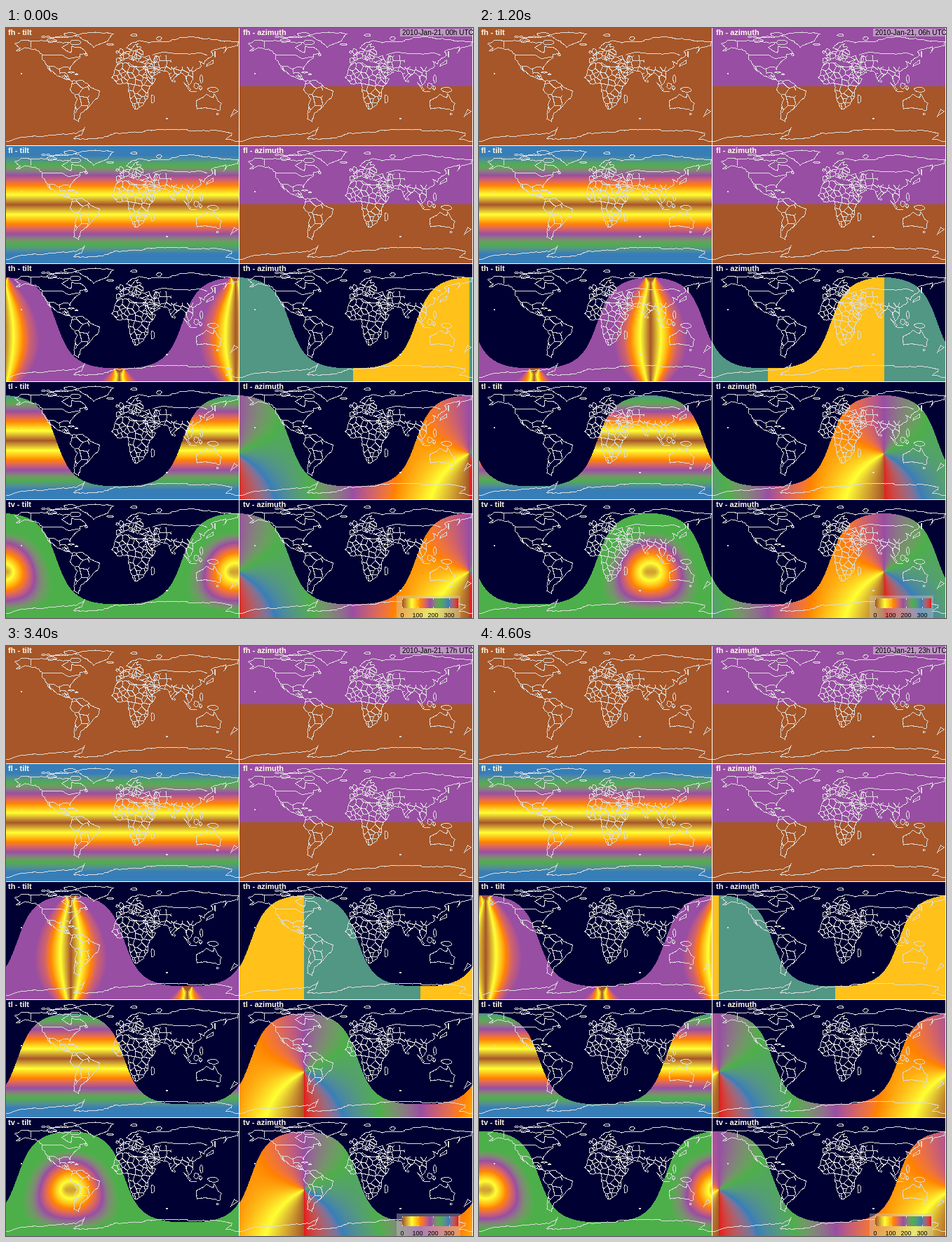
Write an HTML page with a canvas that moves like this. It is 666 by 840 pixels and loops after 4.8 s.

```html
<!DOCTYPE html>
<html lang="en">
<head>
<meta charset="utf-8">
<title>Tilt and azimuth through one day</title>
<style>
html, body { margin: 0; width: 666px; height: 840px; overflow: hidden; background: #fff; }
canvas { display: block; }
</style>
</head>
<body>
<canvas id="stage" width="666" height="840"></canvas>
<script>
const W = 332, H = 168, MAP_H = 167, COL = 333, ROW = 168;
const HOUR_MS = 200;
const RAD = Math.PI / 180;
const NIGHT = -1;

const ctx = document.getElementById('stage').getContext('2d');

function makeLayer() {
  const c = document.createElement('canvas');
  c.width = W;
  c.height = H;
  return c.getContext('2d', { willReadFrequently: true });
}

let seed = 7;
function random() {
  seed = (seed * 16807) % 2147483647;
  return seed / 2147483647;
}

// ---- palette: seven stops, 60 degrees apart, blended in Lab ----
const stops = [[166, 86, 40], [255, 255, 51], [255, 127, 0], [152, 78, 163],
               [77, 175, 74], [55, 126, 184], [228, 26, 28]];

function toLab(rgb) {
  const [r, g, b] = rgb.map(v => v / 255).map(v => v > .04045 ? ((v + .055) / 1.055) ** 2.4 : v / 12.92);
  const f = t => t > .008856 ? Math.cbrt(t) : 7.787 * t + 16 / 116;
  const x = f((.4124 * r + .3576 * g + .1805 * b) / .9505);
  const y = f(.2126 * r + .7152 * g + .0722 * b);
  const z = f((.0193 * r + .1192 * g + .9505 * b) / 1.089);
  return [116 * y - 16, 500 * (x - y), 200 * (y - z)];
}

function toRgb([l, a, b]) {
  const f = t => t > .2069 ? t ** 3 : (t - 16 / 116) / 7.787;
  const fy = (l + 16) / 116;
  const x = .9505 * f(fy + a / 500), y = f(fy), z = 1.089 * f(fy - b / 200);
  return [3.2406 * x - 1.5372 * y - .4986 * z,
          -.9689 * x + 1.8758 * y + .0415 * z,
          .0557 * x - .204 * y + 1.057 * z]
    .map(v => v > .0031308 ? 1.055 * v ** (1 / 2.4) - .055 : 12.92 * v)
    .map(v => Math.round(255 * Math.min(1, Math.max(0, v))));
}

const labStops = stops.map(toLab);
function colorAt(angle) {
  const k = Math.min(5, Math.floor(angle / 60)), f = angle / 60 - k;
  return toRgb(labStops[k].map((v, i) => v + (labStops[k + 1][i] - v) * f));
}
const pack = ([r, g, b]) => (255 << 24 | b << 16 | g << 8 | r) >>> 0;
const palette = Uint32Array.from({ length: 721 }, (_, i) => pack(colorAt(i / 2)));
const nightColor = pack([0, 0, 51]);

// ---- world map: key points in lon/lat, roughened coasts, cell borders ----
const world = makeLayer(), land = makeLayer();
world.fillStyle = '#dcdcdc';
const toX = lon => (lon + 180) * W / 360;
const toY = lat => (90 - lat) * MAP_H / 180;

function plot(points) {
  for (let i = 1; i < points.length; i++) {
    const [x0, y0] = points[i - 1], [x1, y1] = points[i];
    const x = toX(x0), y = toY(y0), dx = toX(x1) - x, dy = toY(y1) - y;
    const n = Math.ceil(Math.max(Math.abs(dx), Math.abs(dy), 1));
    for (let k = 0; k <= n; k++)
      world.fillRect(Math.floor(x + dx * k / n), Math.floor(y + dy * k / n), 1, 1);
  }
}

const pairs = flat => flat.filter((_, i) => i % 2 === 0).map((x, i) => [x, flat[2 * i + 1]]);
const line = (...flat) => plot(pairs(flat));

// Midpoint displacement between two key points; leaves out the first one.
function rough(a, b) {
  const dx = b[0] - a[0], dy = b[1] - a[1], len = Math.hypot(dx, dy);
  if (len < 3) return [b];
  const push = (random() - .5) * Math.min(.25, 2.5 / len);
  const mid = [(a[0] + b[0]) / 2 - dy * push, (a[1] + b[1]) / 2 + dx * push];
  return [...rough(a, mid), ...rough(mid, b)];
}

function coast(...flat) {
  const keys = pairs(flat);
  const points = [keys[0], ...keys.slice(1).flatMap((p, i) => rough(keys[i], p))];
  plot(points);
  return points;
}

function continent(...flat) {
  const points = coast(...flat, flat[0], flat[1]);
  land.beginPath();
  points.forEach(([lon, lat]) => land.lineTo(toX(lon), toY(lat)));
  land.fill();
}

function isle(lon, lat, rx, ry) {
  const points = Array.from({ length: 9 }, (_, i) => {
    const a = i * Math.PI / 4.5, r = .8 + random() * .4;
    return [lon + rx * r * Math.cos(a), lat + ry * r * Math.sin(a)];
  });
  plot([...points, points[0]]);
}

// Country-like cells around jittered seeds, kept to the land inside a box.
function borders(west, south, east, north, step) {
  const seeds = [];
  for (let lat = south; lat < north + step; lat += step)
    for (let lon = west; lon < east + step; lon += step)
      seeds.push([toX(lon + random() * step), toY(lat + random() * step)]);
  const cell = (x, y) => {
    let best = 0, least = Infinity;
    seeds.forEach(([sx, sy], i) => {
      const d = (x - sx) ** 2 + (y - sy) ** 2;
      if (d < least) { least = d; best = i; }
    });
    return best;
  };
  const mask = land.getImageData(0, 0, W, H).data;
  for (let y = Math.floor(toY(north)); y < toY(south); y++)
    for (let x = Math.floor(toX(west)); x < toX(east); x++) {
      if (mask[(y * W + x) * 4 + 3] < 128) continue;
      const c = cell(x, y);
      if (c !== cell(x + 1, y) || c !== cell(x, y + 1)) world.fillRect(x, y, 1, 1);
    }
}

function drawWorld() {
  // the Americas and Greenland
  continent(-166,66, -157,71, -128,70, -95,68, -82,68, -94,60, -80,52, -78,62, -65,60, -56,52, -66,49, -66,44,
    -76,36, -81,26, -84,30, -97,28, -97,20, -88,21, -83,14, -78,8, -86,11, -105,20, -113,30, -110,23, -118,34,
    -124,42, -124,49, -135,58, -150,60, -164,55, -158,59);
  continent(-78,8, -62,10, -50,0, -35,-7, -39,-18, -48,-27, -58,-36, -65,-42, -68,-54, -75,-50, -70,-18, -81,-5);
  continent(-73,78, -54,70, -44,60, -22,70, -14,81, -35,83, -60,82);
  // Africa and Eurasia
  continent(-6,36, 10,37, 20,31, 33,31, 43,12, 51,12, 40,-5, 40,-15, 33,-27, 20,-35, 12,-18, 9,4, -8,4, -17,14, -10,30);
  continent(-9,37, -9,43, -1,44, -4,48, 8,54, 21,56, 29,60, 22,61, 24,66, 17,61, 13,56, 6,59, 14,67, 27,71, 41,67,
    68,69, 104,77, 140,72, 180,69, 178,63, 162,59, 157,52, 160,61, 137,54, 140,48, 127,39, 126,35, 119,39, 122,31,
    108,21, 109,12, 103,2, 98,15, 91,22, 80,13, 77,8, 72,21, 57,26, 48,30, 58,22, 45,13, 34,30, 36,36, 27,38,
    41,42, 31,46, 23,38, 13,45, 18,40, 9,44, 0,40);
  // the south
  continent(114,-22, 130,-12, 140,-17, 142,-11, 153,-26, 150,-37, 138,-34, 124,-33, 115,-34);
  coast(-180,-84, -150,-78, -105,-74, -72,-72, -58,-63, -63,-74, -75,-80, -38,-79, -8,-71, 50,-67, 100,-66,
    145,-67, 170,-72, 160,-81, 180,-84);
  // long islands
  line(130,31, 131,34, 140,41, 140,36, 130,31);
  line(173,-35, 178,-38, 167,-46, 173,-35);
  line(95,6, 106,-4, 104,-6, 95,6);
  line(105,-7, 114,-8);
  [[-73,68,9,4], [-110,71,7,3], [-80,80,9,3], [-56,49,2,2], [-79,22,5,1], [-71,19,2,1], [-156,20,1,.5],
   [-19,65,5,1.5], [-2,54,3,4], [-8,53,2,2], [18,79,5,1.5], [57,74,4,3], [51,42,2.5,5], [47,-19,3,6],
   [81,8,1,1.5], [143,50,1,4], [122,12,2,6], [114,1,4,4], [121,-2,2,3], [141,-5,9,4], [147,-42,1.5,1.5],
   [69,-49,1,.5]].forEach(p => isle(...p));
  for (let lon = -122; lon < -86; lon += 7) isle(lon, 74 + random() * 5, 3, 1);

  line(-123,49, -95,49, -83,43, -67,46);
  line(-141,70, -141,60);
  line(-117,32, -106,31, -97,26);
  line(47,49, 62,53, 80,51, 105,50, 120,52, 131,48);
  borders(-17, -35, 51, 37, 9);
  borders(-9, 37, 32, 58, 6);
  borders(32, 13, 75, 47, 9);
  borders(75, 8, 109, 30, 9);
  borders(-81, -40, -52, 10, 13);
  borders(-93, 8, -78, 18, 4);
}

// ---- sun position for a latitude and an hour angle, in degrees ----
const HALF_HOUR = 7.5;
const sinD = Math.sin(-20 * RAD), cosD = Math.cos(-20 * RAD);
const up = (lat, h) => sinD * Math.sin(lat * RAD) + cosD * Math.cos(lat * RAD) * Math.cos(h * RAD);
const east = h => -cosD * Math.sin(h * RAD);
const north = (lat, h) => sinD * Math.cos(lat * RAD) - cosD * Math.sin(lat * RAD) * Math.cos(h * RAD);

// ---- fields: each gives a palette angle, or NIGHT ----
const clamp = (v, max) => Math.max(-max, Math.min(max, v));
const byDay = field => (lat, h) =>
  up(lat, Math.min(180, Math.abs(h) + HALF_HOUR)) < 0 ? NIGHT : field(lat, h);
const hourMean = f => (lat, h) => (f(lat, h - HALF_HOUR) + f(lat, h + HALF_HOUR)) / 2;

const roll = hourMean((lat, h) => clamp(Math.atan2(east(h), up(lat, h)) / RAD, 45));
const zenith = hourMean((lat, h) => clamp(Math.acos(clamp(up(lat, h), 1)) / RAD, 60));
const fixedAzimuth = lat => lat > 0 ? 180 : 0;
const latTilt = lat => 4 * Math.min(75, Math.abs(lat));
const sunAzimuth = byDay((lat, h) => (Math.atan2(east(h), north(lat, h)) / RAD + 360) % 360);

const panels = [
  ['fh', () => 0, fixedAzimuth],
  ['fl', latTilt, fixedAzimuth],
  ['th', byDay((lat, h) => 4 * Math.abs(roll(lat, h))), byDay((lat, h) => h < 0 ? 90 : 270)],
  ['tl', byDay(latTilt), sunAzimuth],
  ['tv', byDay((lat, h) => 4 * zenith(lat, h)), sunAzimuth]
];

const tile = makeLayer();
const image = tile.createImageData(W, H);
const pixels = new Uint32Array(image.data.buffer);

function paintField(field, sunLon) {
  for (let y = 0; y < H; y++) {
    const lat = 90 - (y + .5) * 180 / MAP_H;
    for (let x = 0; x < W; x++) {
      const lon = (x + .5) * 360 / W - 180;
      const h = (lon - sunLon + 900) % 360 - 180;
      const v = field(lat, h);
      pixels[y * W + x] = v === NIGHT ? nightColor : palette[Math.round(v * 2)];
    }
  }
  tile.putImageData(image, 0, 0);
}

function text(str, x, y, font, color, align = 'left') {
  ctx.font = font + ' "Liberation Sans", Arial, sans-serif';
  ctx.fillStyle = color;
  ctx.textAlign = align;
  ctx.fillText(str, x, y);
}

function box(color, x, y, w, h) {
  ctx.fillStyle = color;
  ctx.fillRect(x, y, w, h);
}

function drawLegend() {
  const x0 = 565, y0 = 812, w = 80, h = 14;
  box('rgba(200,200,200,.4)', 557, 808, 91, 32);
  for (let i = 0; i < w; i++) box(`rgb(${colorAt(i * 360 / (w - 1))})`, x0 + i, y0, 1, h);
  for (let v = 0; v < 360; v += 100) {
    const x = Math.round(x0 + v * w / 360);
    box('#ddd', x, y0, 1, 2);
    box('#ddd', x, y0 + h - 2, 1, 2);
    text(v, x, 839, '9px', '#000', 'center');
  }
}

function draw(hour) {
  const sunLon = 182.8 - 15 * (hour + .5);
  box('#fff', 0, 0, 666, 840);
  panels.forEach(([name, tilt, azimuth], row) => {
    [[tilt, 'tilt'], [azimuth, 'azimuth']].forEach(([field, kind], col) => {
      const x = col * COL, y = row * ROW;
      paintField(field, sunLon);
      ctx.drawImage(tile.canvas, x, y);
      ctx.drawImage(world.canvas, x, y);
      text(`${name} - ${kind}`, x + 3 + 2 * col, y + 10, 'bold 11px', '#fffbe6');
    });
    if (row) box('#fff', 0, row * ROW - 1, 666, 1);
  });
  box('rgba(225,225,225,.5)', 562, 1, 103, 11);
  text(`2010-Jan-21, ${String(hour).padStart(2, '0')}h UTC`, 565, 10, '10px', '#000');
  drawLegend();
}

drawWorld();

let shown = -1;
const start = performance.now();
function tick() {
  const hour = Math.floor((performance.now() - start) / HOUR_MS) % 24;
  if (hour !== shown) draw(shown = hour);
  requestAnimationFrame(tick);
}
tick();
</script>
</body>
</html>
```
